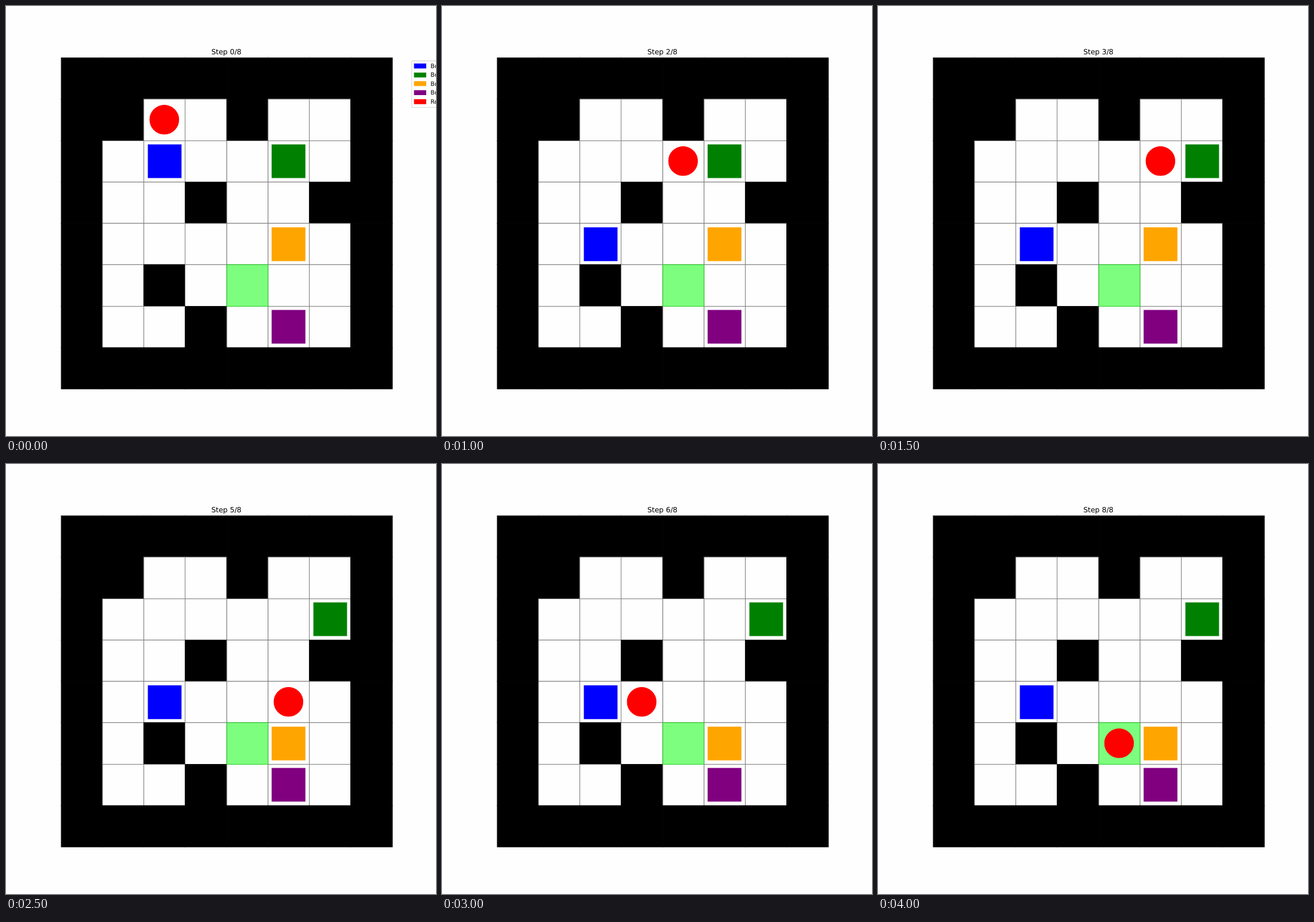
An HTML page that plays this animation: 748 by 748 pixels, repeating every 4500 ms.

```html
<!DOCTYPE html>
<html lang="en">
<head>
<meta charset="utf-8">
<title>Box pushing</title>
<style>
  html, body { margin: 0; width: 100%; height: 100%; overflow: hidden; background: #fefefe; }
  svg { display: block; width: 100vw; height: 100vh; }
  text { font-family: "DejaVu Sans", sans-serif; text-rendering: geometricPrecision; }
</style>
</head>
<body>
<svg id="stage" viewBox="0 0 1000 1000"></svg>
<script>
const STEP_MS = 500;
const CELL = 96.25, LEFT = 127.5, TOP = 120, LINE = 1.39;
const MAP = [
  "########",
  "##..#..#",
  "#......#",
  "#..#..##",
  "#......#",
  "#.#..G.#".replace("G", "."),
  "#..#...#",
  "########"
];
const GOAL = [4, 5];
const ROBOT_PATH = [[2, 1], [2, 2], [4, 2], [5, 2], [5, 3], [5, 4], [3, 4], [3, 5], [4, 5]];
const BOXES = [
  { color: "blue", from: [2, 2], to: [2, 4], movesAt: 1 },
  { color: "green", from: [5, 2], to: [6, 2], movesAt: 3 },
  { color: "orange", from: [5, 4], to: [5, 5], movesAt: 5 },
  { color: "purple", from: [5, 6], to: [5, 6], movesAt: 0 }
];

const stage = document.getElementById("stage");
const snap = v => Math.floor(v + 0.5) + 0.5;
const px = col => LEFT + col * CELL;
const py = row => TOP + row * CELL;

function set(el, attrs) {
  for (const name in attrs) el.setAttribute(name, attrs[name]);
  return el;
}

function add(tag, attrs, parent = stage) {
  const el = document.createElementNS("http://www.w3.org/2000/svg", tag);
  return parent.appendChild(set(el, attrs));
}

// Rectangle in grid units with its edges snapped to the pixel raster.
function gridRect(col, row, size) {
  const x = snap(px(col)), y = snap(py(row));
  return { x, y, width: snap(px(col + size)) - x, height: snap(py(row + size)) - y };
}

const paint = (fill, stroke = fill) => ({ fill, stroke, "stroke-width": LINE });

MAP.forEach((line, row) => [...line].forEach((kind, col) => {
  const style = kind === "#" ? paint("black") : paint("#fefefe", "gray");
  add("rect", { ...gridRect(col, row, 1), ...style });
}));

add("rect", {
  ...gridRect(...GOAL, 1), ...paint("lime"), "fill-opacity": 0.5, "stroke-opacity": 0.5
});

const boxes = BOXES.map(box => add("rect", paint(box.color)));
const robot = add("circle", { r: 0.35 * CELL, ...paint("red") });
const title = add("text", { x: 512.5, y: 111.7, "font-size": 16.667, "text-anchor": "middle" });

const legend = add("g", {});
add("rect", {
  x: 943.5, y: 127.5, width: 90, height: 108.5, rx: 2.8, ...paint("#fefefe", "#d6d6d6")
}, legend);
[...BOXES.map((box, i) => [box.color, `Box ${i + 1}`]), ["red", "Robot"]].forEach(([color, label], i) => {
  const y = 138.8 + 20.7 * i;
  add("rect", { x: 949.5, y: snap(y - 4.9), width: 27, height: 10, ...paint(color) }, legend);
  add("text", { x: 987.4, y: y + 5.1, "font-size": 13.889 }, legend).textContent = label;
});

function draw(step) {
  title.textContent = `Step ${step}/${ROBOT_PATH.length - 1}`;
  legend.style.display = step === 0 ? "" : "none";
  const [col, row] = ROBOT_PATH[step];
  set(robot, { cx: px(col + 0.5), cy: py(row + 0.5) });
  BOXES.forEach((box, i) => {
    const [c, r] = step < box.movesAt ? box.from : box.to;
    set(boxes[i], gridRect(c + 0.1, r + 0.1, 0.8));
  });
}

const start = performance.now();
let shown = -1;
function tick() {
  const step = Math.floor((performance.now() - start) / STEP_MS) % ROBOT_PATH.length;
  if (step !== shown) draw(shown = step);
  requestAnimationFrame(tick);
}
tick();
</script>
</body>
</html>
```
